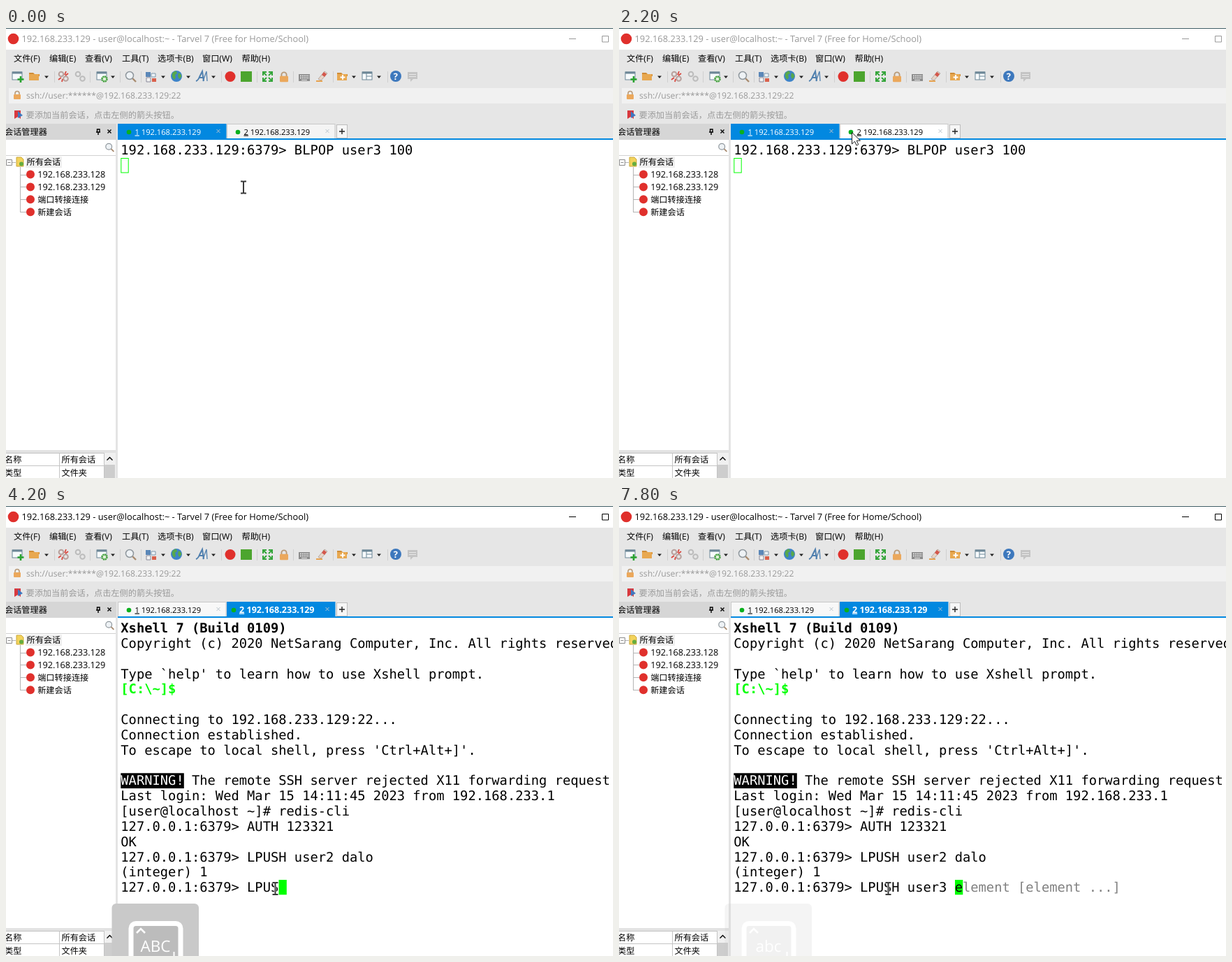
Animation of 869x644 px, one loop 8000 ms. Source, as an HTML page:

```html
<!DOCTYPE html>
<html lang="zh">
<head>
<meta charset="utf-8">
<title>Terminal session</title>
<style>
html, body { margin: 0; width: 100%; height: 100%; overflow: hidden; background: #fff; }
svg { display: block; width: 869px; height: 644px; }
text { white-space: pre; text-rendering: geometricPrecision; }
.ui { font: 12.2px "Open Sans", "Noto Sans CJK SC", "Noto Sans CJK JP", "Noto Sans CJK", sans-serif; fill: #000; }
.ip { font-size: 12.7px; }
.caption { font-size: 12.85px; }
.gray { fill: #999; }
.tab { font-size: 11.15px; }
.tab tspan { text-decoration: underline; }
.term { font: 18.785px "DejaVu Sans Mono", monospace; fill: #000; }
.bold { font-weight: 700; }
.prompt { fill: #0f0; font-weight: 700; }
.hint { fill: #808080; }
.win, .line { fill: none; stroke: #000; }
</style>
</head>
<body>
<svg viewBox="0 0 869 644">
  <defs>
    <path id="caret" d="M-3-1.5h6L0 2z" fill="#222"/>
    <path id="sep" d="M0-8V8" stroke="#cfcfcf"/>
    <circle id="logo" r="6" fill="#e0302c"/>
    <g id="lock">
      <path d="M-3 0v-2.5a3 3 0 0 1 6 0V0" fill="none" stroke="#b89a78" stroke-width="1.6"/>
      <rect x="-5" y="-1" width="10" height="7" rx="1" fill="#eba85c"/>
    </g>
    <g id="lens" fill="none">
      <path d="M3 3l5 5" stroke="#a98c70" stroke-width="2.4"/>
      <circle cx="-1" cy="-1" r="5.5" fill="#eef2f5" stroke="#8f979d" stroke-width="1.5"/>
    </g>
    <g id="folder" fill="#e8a850"><path d="M-8-5h6l2 2h7v3H-8z" fill="#cf8c36"/><path d="M-8 6V-3H6V6z"/></g>
    <g id="frame"><rect x="-7" y="-6" width="14" height="11" fill="#f7fafc" stroke="#6d8797"/><path d="M-7-5H7" stroke="#6d8797" stroke-width="3"/></g>
    <g id="chain" fill="none" stroke-width="2"><circle cx="-3" cy="-3" r="3.3"/><circle cx="3.5" cy="3.5" r="3.3"/></g>
    <path id="ibeam" d="M-4-8.5h3l1 1 1-1h3M0-7.5v15M-4 8.5h3l1-1 1 1h3" fill="none"/>
  </defs>

  <!-- window chrome -->
  <rect width="869" height="644" fill="#fff"/>
  <rect y="31" width="869" height="129" fill="#e6e6e6"/>
  <rect width="869" height="1" fill="#3d5a61"/>
  <use href="#logo" transform="translate(10.5 15.5) scale(1.3)"/>
  <text id="title" class="ui caption" x="22.5" y="20">192.168.233.129 - user@localhost:~ - Tarvel 7 (Free for Home/School)</text>
  <path id="buttons" class="win" d="M806 15.5h10M853.5 11.5h9v8.5h-9z"/>
  <g id="menu" class="ui"></g>

  <!-- toolbar -->
  <g id="marks"></g>
  <g transform="translate(16 69)"><use href="#frame"/><path d="M5 0v9M.5 4.5h9" stroke="#29a32f" stroke-width="2.6"/></g>
  <use href="#folder" x="41" y="69"/>
  <g transform="translate(82 69)"><use href="#chain" stroke="#b8a09c"/><path d="M-7 5l4-3M4-7L2-2M7-4L3-1M-2 8l1-4" stroke="#d9483f" stroke-width="1.8"/></g>
  <use href="#chain" x="106" y="69" stroke="#bcbcbc"/>
  <g transform="translate(137 69)"><use href="#frame"/><circle cx="4" cy="4" r="3.5" fill="#dff0d8" stroke="#3f9d3a" stroke-width="2.5" stroke-dasharray="2 .7"/></g>
  <use href="#lens" x="178" y="69"/>
  <g transform="translate(208 69)"><path d="M-8-6h7v7h-7z" fill="#5a87b8"/><path d="M0-4h6v5H0z" fill="#edf2f6" stroke="#7d96aa"/><path d="M-7 2h6v6h-6z" fill="#f2f2f2" stroke="#889"/><path d="M1 3h6v5H1z" fill="#d9604b"/></g>
  <g transform="translate(244 69)"><circle r="8" fill="#3d83c9"/><path d="M-6-4q4-5 6-3l1 3-3 2 1 4-2 3q-4-3-3-9zM3-5q5 2 4 6l-3 3-2-4z" fill="#57a84d"/></g>
  <g transform="translate(280 69)" fill="none" stroke="#4f7fae" stroke-width="2"><path d="M-8 7q3-1 5-6l4-8 2 14M-3 2h6"/><path d="M2 7L7-7l1 14" stroke-width="1.3"/></g>
  <use href="#logo" transform="translate(321 69.5) scale(1.25)"/>
  <rect x="336" y="62" width="16" height="15" fill="#4ca52e"/>
  <path d="M368 68v-5h5M376 63h5v5M381 71v5h-5M373 76h-5v-5M368 63l5 5M381 63l-5 5M381 76l-5-5M368 76l5-5" fill="none" stroke="#34a53a" stroke-width="2"/>
  <use href="#lock" transform="translate(398 70) scale(1.2)"/>
  <g transform="translate(427 70)"><path d="M-8-4H8V6H-8z" fill="#8c8c8c"/><path d="M-6-1.5H7M-6 1.5H7" stroke="#eee" stroke-width="1.5" stroke-dasharray="2 1"/><path d="M-4 4.5h8" stroke="#eee"/></g>
  <g transform="translate(452 69)"><path d="M-5 4L4-7l4 3-9 10z" fill="#e8d5c8" stroke="#b6a8a0"/><path d="M3-6l4 3-3 4-4-3z" fill="#d4574c"/><path d="M-8 7h9" stroke="#e7a24d" stroke-width="2"/></g>
  <use href="#folder" x="482" y="69"/><path d="M482 67v7M478.5 70.5h7" stroke="#fff" stroke-width="2"/>
  <g transform="translate(517 69)"><use href="#frame"/><path d="M-1-4V5M-1 0H7" stroke="#6d8797"/></g>
  <circle cx="558" cy="69" r="8" fill="#3d78bd"/><text class="ui bold" x="554.8" y="74" style="fill:#fff;font-size:13px">?</text>
  <path d="M575 63h14v10h-6l-4 4v-4h-4z" fill="#c4c4c4"/><path d="M577 66.5h10M577 69.5h10" stroke="#e8e8e8"/>

  <!-- address and tip bars -->
  <rect x="4" y="86" width="865" height="22" fill="#f1f1f1"/>
  <use href="#lock" x="16" y="96"/>
  <text class="ui gray" x="29" y="101">ssh://user:******@192.168.233.129:22</text>
  <path d="M12 118h9v12l-4-3-5 3z" fill="#d8393f"/><path d="M17 119l7 6-7 4z" fill="#3f78c0"/>
  <text class="ui gray" x="28.5" y="128.5">要添加当前会话，点击左侧的箭头按钮。</text>

  <!-- session panel -->
  <rect y="137" width="158" height="23" fill="#d6d6d6"/>
  <text class="ui" x="-2" y="152.5">会话管理器</text>
  <path class="line" d="M129 149h6M132 149v4M130.5 149v-4h3.5v4M145.5 145.5l5 5M150.5 145.5l-5 5" stroke-width="1.4"/>
  <rect y="160" width="157" height="484" fill="#fff"/>
  <path d="M0 182.5h157" stroke="#d2d2d2"/>
  <use href="#lens" transform="translate(148 170.5) scale(.8)"/>
  <rect x="157" y="160" width="3" height="484" fill="#e4e4e4"/>
  <rect x="28" y="184" width="52" height="16" fill="#efefef"/>
  <path d="M9 192.5h5M20.5 199v64.5" stroke="#b5b5b5"/>
  <path d="M.5 188.5h8v8h-8zM2.5 192.5h4" fill="#fff" stroke="#8d8d8d"/>
  <path d="M15 185h7l3 3v10H15z" fill="#f3d35c" stroke="#c9a63c"/><circle cx="22" cy="194.5" r="3" fill="#65ad3e"/>
  <g id="tree" class="ui"><text x="29.5" y="196">所有会话</text></g>
  <rect y="604" width="157" height="4" fill="#e2e2e2"/>
  <path d="M0 608.5h141M0 626.5h141M76.5 608v36M140.5 608v36" stroke="#c4c4c4"/>
  <rect x="141" y="608" width="16" height="36" fill="#f0f0f0"/>
  <rect x="141" y="625" width="15" height="19" fill="#cdcdcd"/>
  <path class="line" d="M144.5 618.5l4-4 4 4" stroke-width="1.4"/>
  <g class="ui"><text x="-2" y="621.5">名称</text><text x="79.5" y="621.5">所有会话</text><text x="-2" y="640.5">类型</text><text x="79.5" y="640.5">文件夹</text></g>

  <!-- tabs -->
  <rect id="tabBox1" x="160.5" y="137.5" width="154.5" height="21"/>
  <rect id="tabBox2" x="316.5" y="137.5" width="154.5" height="21"/>
  <circle cx="176" cy="149" r="3.3" fill="#0ab01e"/>
  <circle id="dot2" cy="149" r="3.3" fill="#0ab01e"/>
  <text id="tab1" class="ui tab" x="184.5" y="152.5"><tspan>1</tspan> 192.168.233.129</text>
  <text id="tab2" class="ui tab" y="152.5"><tspan>2</tspan> 192.168.233.129</text>
  <path d="M301.5 145l5 5M306.5 145l-5 5M457.5 145l5 5M462.5 145l-5 5" stroke="#b9c4cc"/>
  <rect x="473.5" y="138.5" width="15" height="19" fill="#f6f6f6" stroke="#bdbdbd"/>
  <path d="M477 148h8M481 144v8" stroke="#222" stroke-width="1.4"/>
  <rect x="160" y="158" width="709" height="2" fill="#0288e0"/>

  <!-- terminals -->
  <g id="screen1" class="term"><rect x="164.8" y="186.5" width="10.4" height="20.5" fill="none" stroke="#0f0"/></g>
  <g id="screen2" class="term">
    <rect x="164.3" y="382.3" width="90.5" height="21.8"/>
    <rect id="block" y="535" width="11.3" height="21.3" fill="#0f0"/>
    <text id="entry" x="164.3" y="552.2"><tspan></tspan><tspan class="hint"></tspan></text>
  </g>

  <!-- caps lock overlay -->
  <g id="osd">
    <rect x="151.5" y="569" width="124.5" height="90" rx="6" fill="#c9c9c9"/>
    <rect x="179" y="597.5" width="71" height="70" rx="7" fill="#bcbcbc" stroke="#fff" stroke-width="7"/>
    <path d="M187 611l6-6 6 6" fill="none" stroke="#fff" stroke-width="2.6"/>
    <path d="M240.5 638v6" stroke="#fff" stroke-width="2"/>
    <text id="caps" x="214" y="637.5" text-anchor="middle" fill="#fff" style="font:22.5px 'Open Sans',sans-serif"></text>
  </g>

  <!-- pointer -->
  <g id="mouse">
    <g id="beam"><use href="#ibeam" stroke="#fff" stroke-width="3.4"/><use href="#ibeam" stroke="#3a3a3a" stroke-width="2"/></g>
    <path id="arrow" d="M.5.5v16.5l4-3.7 2.6 5.7 2.7-1.2-2.6-5.6h5.3z" fill="#fff" stroke="#222"/>
  </g>
</svg>
<script>
const $ = id => document.getElementById(id);
const add = (parent, tag, attrs, text = '') => {
  const el = document.createElementNS('http://www.w3.org/2000/svg', tag);
  for (const k in attrs) el.setAttribute(k, attrs[k]);
  el.textContent = text;
  return parent.appendChild(el);
};
const set = (id, attrs) => { for (const k in attrs) $(id).setAttribute(k, attrs[k]); };
const show = (id, on) => $(id).style.display = on ? '' : 'none';

const LOOP = 8000, LEFT = 164.3, CELL = 11.31, ROW = 21.83;
const BLUE = '#0288e0';
const PROMPT = '127.0.0.1:6379> ';

const menu = { 11: '文件(F)', 62: '编辑(E)', 113: '查看(V)', 166: '工具(T)', 217: '选项卡(B)', 281: '窗口(W)', 337.5: '帮助(H)' };
for (const x in menu) add($('menu'), 'text', { x, y: 47.5 }, menu[x]);
for (const x of [58, 153, 225, 261, 297, 498, 534]) add($('marks'), 'use', { href: '#caret', x, y: 70 });
for (const x of [69, 120, 163, 193, 308, 359, 411, 468, 546]) add($('marks'), 'use', { href: '#sep', x: x + .5, y: 70 });

['192.168.233.128', '192.168.233.129', '端口转接连接', '新建会话'].forEach((name, i) => {
  const y = 209.5 + i * 17.9;
  add($('tree'), 'path', { d: `M20 ${Math.round(y)}.5h9`, stroke: '#b5b5b5' });
  add($('tree'), 'use', { href: '#logo', x: 35, y });
  add($('tree'), 'text', { x: 45.2, y: y + 4.5, class: i < 2 ? 'ip' : '' }, name);
});

const print = (screen, row, text, attrs) =>
  add($(screen), 'text', { x: LEFT, y: 181.1 + row * ROW, ...attrs }, text);
print('screen1', 0, '192.168.233.129:6379> BLPOP user3 100');
print('screen2', 0, 'Xshell 7 (Build 0109)', { class: 'bold' });
print('screen2', 4, '[C:\\~]$', { class: 'prompt' });
print('screen2', 10, 'WARNING!', { fill: '#fff' });
const log = {
  1: 'Copyright (c) 2020 NetSarang Computer, Inc. All rights reserved.',
  3: "Type `help' to learn how to use Xshell prompt.",
  6: 'Connecting to 192.168.233.129:22...',
  7: 'Connection established.',
  8: "To escape to local shell, press 'Ctrl+Alt+]'.",
  10: ' '.repeat(9) + 'The remote SSH server rejected X11 forwarding request',
  11: 'Last login: Wed Mar 15 14:11:45 2023 from 192.168.233.1',
  12: '[user@localhost ~]# redis-cli',
  13: PROMPT + 'AUTH 123321',
  14: 'OK',
  15: PROMPT + 'LPUSH user2 dalo',
  16: '(integer) 1'
};
for (const row in log) print('screen2', row, log[row]);

const COMMAND = 'LPUSH user3 ';
const keyTimes = [3600, 3870, 4070, 4200, 4730, 5270, 5870, 6000, 6200, 6400, 7130, 7330];
const track = [
  [0, 340, 228], [200, 296, 200], [400, 230, 167], [600, 300, 182], [870, 439, 192], [1000, 463, 192],
  [1470, 590, 194], [1670, 590, 194], [2130, 337, 151], [2200, 333, 149], [2300, 333, 152],
  [2530, 315, 531], [2730, 373, 533], [2870, 385, 547], [3000, 385, 547], [3070, 385.5, 547.5]
];

function pointer(t) {
  const i = track.findIndex(p => p[0] > t);
  if (i < 0) return track.at(-1).slice(1);
  const [a, b] = [track[i - 1], track[i]];
  const k = (t - a[0]) / (b[0] - a[0]);
  return [a[1] + (b[1] - a[1]) * k, a[2] + (b[2] - a[2]) * k];
}

// Command-line argument hint for the text typed so far
function hintFor(typed) {
  if (typed.length < 5) return '';
  const words = typed.trim().split(' ').length;
  const rest = ['key', 'element [element ...]'].slice(words - 1).join(' ');
  return (typed.endsWith(' ') ? '' : ' ') + rest;
}

function overlayAlpha(t) {
  if (t < 3470) return 0;
  if (t < 5600) return Math.max(0, Math.min(1, 1 - (t - 5000) / 400));
  return Math.max(.2, Math.min(1, 1 - (t - 7130) / 250));
}

function drawTabs(second, hover) {
  set('tabBox1', { fill: second ? '#f8f8f8' : BLUE, stroke: second ? '#c8c8c8' : BLUE });
  set('tabBox2', { fill: second ? BLUE : hover ? '#fff' : '#f4f4f4', stroke: second ? BLUE : '#c8c8c8' });
  $('tab1').style.fill = second ? '#000' : '#fff';
  set('tab2', { x: second ? 334 : 340.5 });
  set('dot2', { cx: second ? 326 : 332 });
  Object.assign($('tab2').style, second
    ? { fill: '#fff', fontWeight: 700, fontSize: '12.6px' }
    : { fill: '#000', fontWeight: 400, fontSize: '' });
  $('title').style.fill = second ? '#000' : '#999';
  $('buttons').style.stroke = second ? '#000' : '#999';
}

function drawEntry(t) {
  const typed = COMMAND.slice(0, keyTimes.filter(k => k <= t).length);
  const hint = hintFor(typed);
  const [dark, pale] = $('entry').children;
  dark.textContent = PROMPT + typed + hint.slice(0, 1);
  pale.textContent = hint.slice(1);
  set('block', { x: LEFT + CELL * (PROMPT.length + typed.length) });
}

function draw(now) {
  // the picture advances 15 times a second
  const t = Math.floor((now % LOOP + 5) * .015) / .015 + 5;
  const second = t >= 2270;
  const [x, y] = pointer(t - 5);
  const arrow = y < 159;
  show('screen1', !second);
  show('screen2', second);
  drawTabs(second, arrow && x > 316 && x < 471);
  drawEntry(t);
  set('osd', { opacity: overlayAlpha(t) });
  $('caps').textContent = t < 5600 ? 'ABC' : 'abc';
  set('mouse', { transform: `translate(${x} ${y})` });
  show('arrow', arrow);
  show('beam', !arrow);
}

const start = performance.now();
function loop() {
  draw(performance.now() - start);
  requestAnimationFrame(loop);
}
loop();
</script>
</body>
</html>
```
